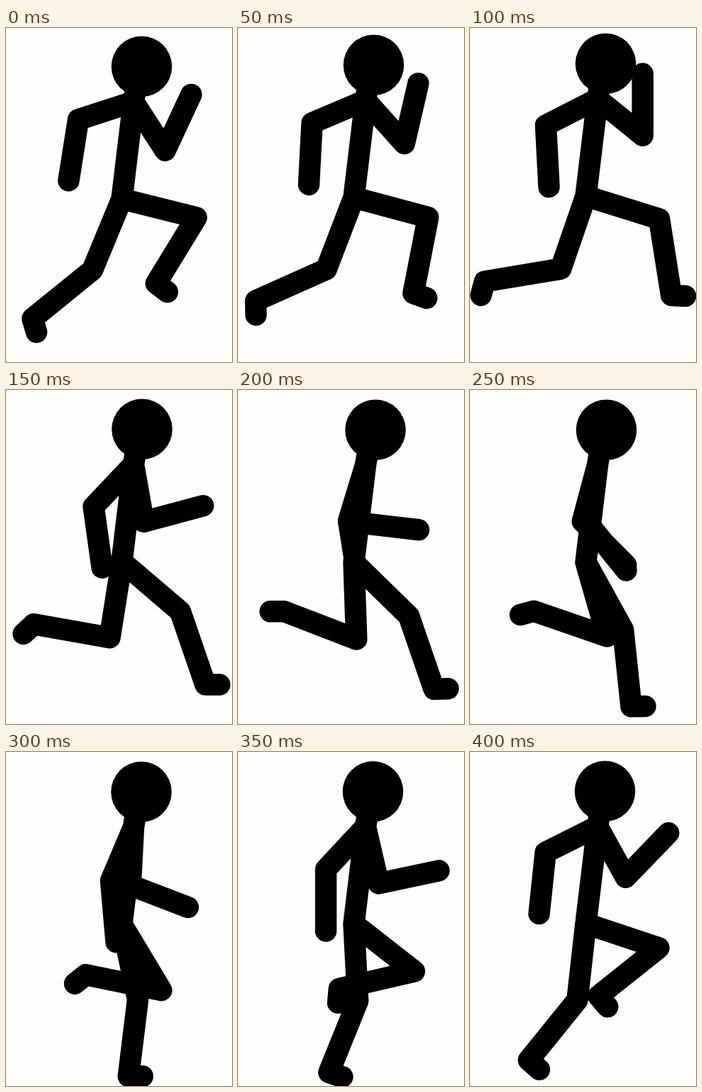
Write an HTML page that moves like this. It is 319x471 px and loops after 0.45 s.

```html
<!DOCTYPE html>
<html lang="en">
<head>
<meta charset="utf-8">
<title>Runner</title>
<style>
  html, body { margin: 0; width: 100%; height: 100%; overflow: hidden; background: #fdfffc; }
  svg { display: block; width: 100%; height: 100%; }
  path { fill: none; stroke: #000; stroke-width: 30.5; stroke-linecap: round; stroke-linejoin: round; }
</style>
</head>
<body>
<svg viewBox="0 0 319 471">
  <circle id="head" r="42.8"/>
  <path id="limbs"/>
</svg>
<script>
const STEP = 50;
const ARM = [82, 87], LEG = [108.5, 109, 20];

// Bone angles in degrees, clockwise from the right.
const poses = [
  { lift: 0,  head: 191.5, back: [162, 99],   fore: [57, -65],  lead: [14, 121.5, 37], trail: [112.5, 141, 73] },
  { lift: -2, head: 191.5, back: [157, 93],   fore: [48, -77],  lead: [15, 101, 20],   trail: [111, 156, 89] },
  { lift: -4, head: 191.5, back: [153, 87],   fore: [39, -90],  lead: [17.3, 81, 3],   trail: [109, 170.5, 105] },
  { lift: 1,  head: 192,   back: [133.5, 82], fore: [80, -15],  lead: [40.5, 71, 0],   trail: [99, 190, 137] },
  { lift: 2,  head: 194,   back: [107, 81],   fore: [98, 6.6],  lead: [44.3, 71, -2],  trail: [88, 201, 180] },
  { lift: 2,  head: 192.5, back: [105, 45],   fore: [100, 51],  lead: [61, 84, -1],    trail: [74, 199, 165] },
  { lift: 2,  head: 191,   back: [113, 85],   fore: [93, 21],   lead: [78, 97, 0],     trail: [59, 191.6, 141] },
  { lift: 1.5, head: 190.5, back: [133, 90],  fore: [77, -12],  lead: [87, 112, 18],   trail: [38, 167, 95] },
  { lift: 1,  head: 190.5, back: [153.5, 96], fore: [61, -46],  lead: [96.4, 129, 41], trail: [18.4, 141.5, 49] }
];

const head = document.getElementById('head');
const limbs = document.getElementById('limbs');

function chain([x, y], lengths, angles) {
  let d = `M${x} ${y}`;
  angles.forEach((deg, i) => {
    const a = deg * Math.PI / 180;
    d += `l${lengths[i] * Math.cos(a)} ${lengths[i] * Math.sin(a)}`;
  });
  return d;
}

function draw(pose) {
  const neck = [182, 92 + pose.lift];
  const shoulder = [180, 104 + pose.lift];
  const hip = [163.5, 241 + pose.lift];
  head.setAttribute('cx', pose.head);
  head.setAttribute('cy', 54.3 + pose.lift);
  limbs.setAttribute('d', [
    `M${neck}L${shoulder}L${hip}`,
    chain(shoulder, ARM, pose.back),
    chain(shoulder, ARM, pose.fore),
    chain(hip, LEG, pose.lead),
    chain(hip, LEG, pose.trail)
  ].join(''));
}

let start;
function tick(now) {
  start ??= now;
  draw(poses[Math.floor((now - start) / STEP) % poses.length]);
  requestAnimationFrame(tick);
}
draw(poses[0]);
requestAnimationFrame(tick);
</script>
</body>
</html>
```
